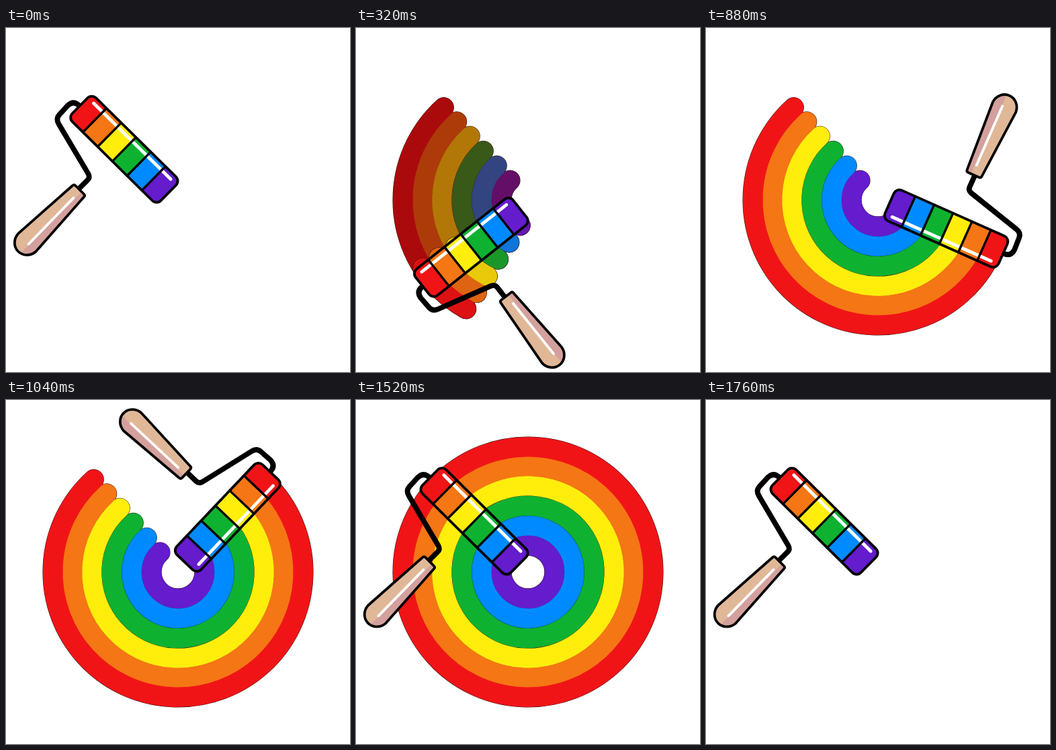
An HTML page with a canvas for the animation above (1920 ms loop, 512 by 512 pixels).

```html
<!DOCTYPE html>
<html lang="en">
<head>
<meta charset="utf-8">
<title>Rainbow paint roller</title>
<style>
html, body { margin: 0; width: 100%; height: 100%; overflow: hidden; background: #fff; }
canvas { display: block; width: 100vmin; height: 100vmin; }
</style>
</head>
<body>
<canvas id="stage" width="512" height="512"></canvas>
<script>
const ctx = document.getElementById('stage').getContext('2d');
const LOOP = 1920, STEP = 40, CENTER = 256;
const START = 227.7, FIRST_END = 123, LOW = 210, HIGH = 540, GONE = 1760;
const EDGE = 3.8;

// From the hub outwards.
const COLORS = [
  [100, 28, 205], [0, 138, 255], [14, 178, 48],
  [255, 238, 12], [245, 118, 20], [241, 20, 23]
];
const RADII = [39.6, 69, 98.7, 128.5, 157.5, 186.3];

// Time and the direction from the hub to the roller, in degrees.
const KEYS = [
  [0, 223.6], [LOW, 114], [320, 140.6], [HIGH, 223.6], [640, 178.5],
  [880, 23], [1200, -95.5], [1520, -136.3], [LOOP, -136.3]
];

const rad = deg => deg * Math.PI / 180;
const clamp = x => Math.max(0, Math.min(1, x));
const rgb = c => `rgb(${c.map(Math.round)})`;

const rate = i => (KEYS[i + 1][1] - KEYS[i][1]) / (KEYS[i + 1][0] - KEYS[i][0]);

function slope(i) {
  if (i === 0 || i === KEYS.length - 1) return 0;
  const a = rate(i - 1), b = rate(i);
  return a * b > 0 ? 2 * a * b / (a + b) : 0;
}

// Monotone cubic through the keys.
function pose(t) {
  let i = 0;
  while (i < KEYS.length - 2 && t >= KEYS[i + 1][0]) i++;
  const [t0, a] = KEYS[i], [t1, b] = KEYS[i + 1];
  const d = t1 - t0, s = (t - t0) / d, r = 1 - s;
  return a * r * r * (1 + 2 * s) + b * s * s * (3 - 2 * s)
    + d * s * r * (r * slope(i) - s * slope(i + 1));
}

function bands(from, to, mix, light) {
  const each = (extra, color) => RADII.forEach((r, i) => {
    const end = rad(to) - Math.asin(11 / r);
    ctx.beginPath();
    ctx.arc(CENTER, CENTER, r, rad(from), end, true);
    ctx.lineWidth = 29.5 + extra;
    ctx.strokeStyle = color(i);
    ctx.stroke();
  });
  each(1, () => '#301010');
  each(0, i => rgb(COLORS[i].map((v, k) => light * (v * mix + (k ? 0 : 100 * (1 - mix))))));
}

function paint(t, angle) {
  if (t < STEP || t >= GONE) return;
  const light = 1 - clamp((t - 1600) / 240);
  if (t < HIGH) {
    bands(START, t < LOW ? Math.max(angle, FIRST_END) : FIRST_END, 0.5, 1);
    if (t > LOW && angle + 6.5 > FIRST_END) {
      bands(Math.min(START, angle + 6.5), FIRST_END, 0.85 + 0.15 * clamp((t - 320) / 120), 1);
    }
  } else {
    bands(START, Math.min(angle, FIRST_END), 1, light);
  }
}

function line(path, width, color) {
  ctx.lineWidth = width;
  ctx.strokeStyle = color;
  ctx.stroke(new Path2D(path));
}

const ROD = 'M53 261 Q41 261 40.5 273 L41.5 292 Q42 300 51 302 L134 323 Q140 325 140 330 V349';
const HANDLE = new Path2D('M134 349 H151 Q154 349 154 352 L161 460 A18.8 20 0 0 1 123.5 460 L130 352 Q130 349 134 349Z');

function roller(angle) {
  ctx.save();
  ctx.translate(CENTER, CENTER);
  ctx.rotate(rad(angle - 178.5));
  ctx.translate(-CENTER, -CENTER);

  line(ROD, 7.8, '#000');

  ctx.save();
  ctx.clip(HANDLE);
  ctx.fillStyle = '#e0b898';
  ctx.fillRect(120, 345, 45, 140);
  ctx.fillStyle = '#d3a09d';
  ctx.fillRect(146.5, 345, 20, 140);
  ctx.restore();
  line('M144 364 L145.5 460', 3.8, '#fff');
  line(HANDLE, EDGE, '#000');

  ctx.translate(146, 259.5);
  ctx.rotate(rad(-0.5));
  const body = new Path2D();
  body.roundRect(-92.5, -25, 185, 50, 9);
  ctx.save();
  ctx.clip(body);
  COLORS.forEach((c, i) => {
    ctx.fillStyle = rgb(c);
    ctx.fillRect(61.5 - i * 30.8, -26, 32, 52);
  });
  ctx.restore();
  line('M-80.5 -17 H80.5', 4.8, '#fff');
  for (let i = -2; i <= 2; i++) line(`M${i * 30.8} -25 V25`, 3.4, '#000');
  line(body, EDGE, '#000');
  ctx.restore();
}

function draw(now) {
  const t = Math.floor(now % LOOP / STEP) * STEP;
  const angle = pose(t);
  ctx.fillStyle = '#fff';
  ctx.fillRect(0, 0, 512, 512);
  ctx.lineCap = ctx.lineJoin = 'round';
  paint(t, angle);
  roller(angle);
}

let begin;
function tick(now) {
  begin ??= now;
  draw(now - begin);
  requestAnimationFrame(tick);
}
draw(0);
requestAnimationFrame(tick);
</script>
</body>
</html>
```
